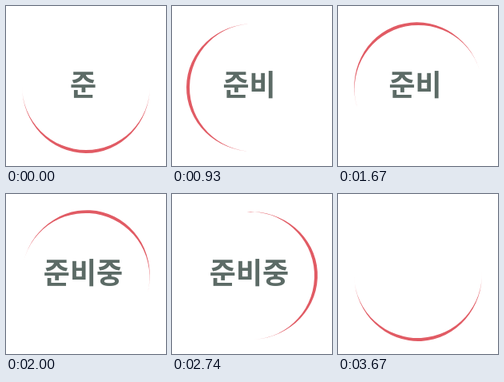
Recreate the animation shown at these times as an HTML page. Size 200 by 200 pixels, loop 3.7 s.

```html
<!DOCTYPE html>
<html lang="ko">
<head>
<meta charset="utf-8">
<style>
html, body { margin: 0; width: 100%; height: 100%; overflow: hidden; background: #fff; }
svg { display: block; width: 100vw; height: 100vh; }
text { font: 700 36px "Noto Sans CJK KR", "Noto Sans CJK", sans-serif; fill: #5c6b66; text-anchor: middle; }
</style>
</head>
<body>
<svg viewBox="0 0 200 200">
  <path id="crescent" fill="#e15b64" d="M20 100A80 80 0 0 0 180 100A80 84 0 0 1 20 100"/>
  <text id="label" x="96.5" y="112"></text>
</svg>
<script>
const LOOP = 3700;
const labels = ["준", "준비", "준비중", ""];
const crescent = document.getElementById("crescent");
const label = document.getElementById("label");

function draw() {
  const turn = performance.now() % LOOP / LOOP;
  crescent.setAttribute("transform", `rotate(${turn * 360} 100 102)`);
  label.textContent = labels[Math.floor(turn * labels.length)];
  requestAnimationFrame(draw);
}
draw();
</script>
</body>
</html>
```
